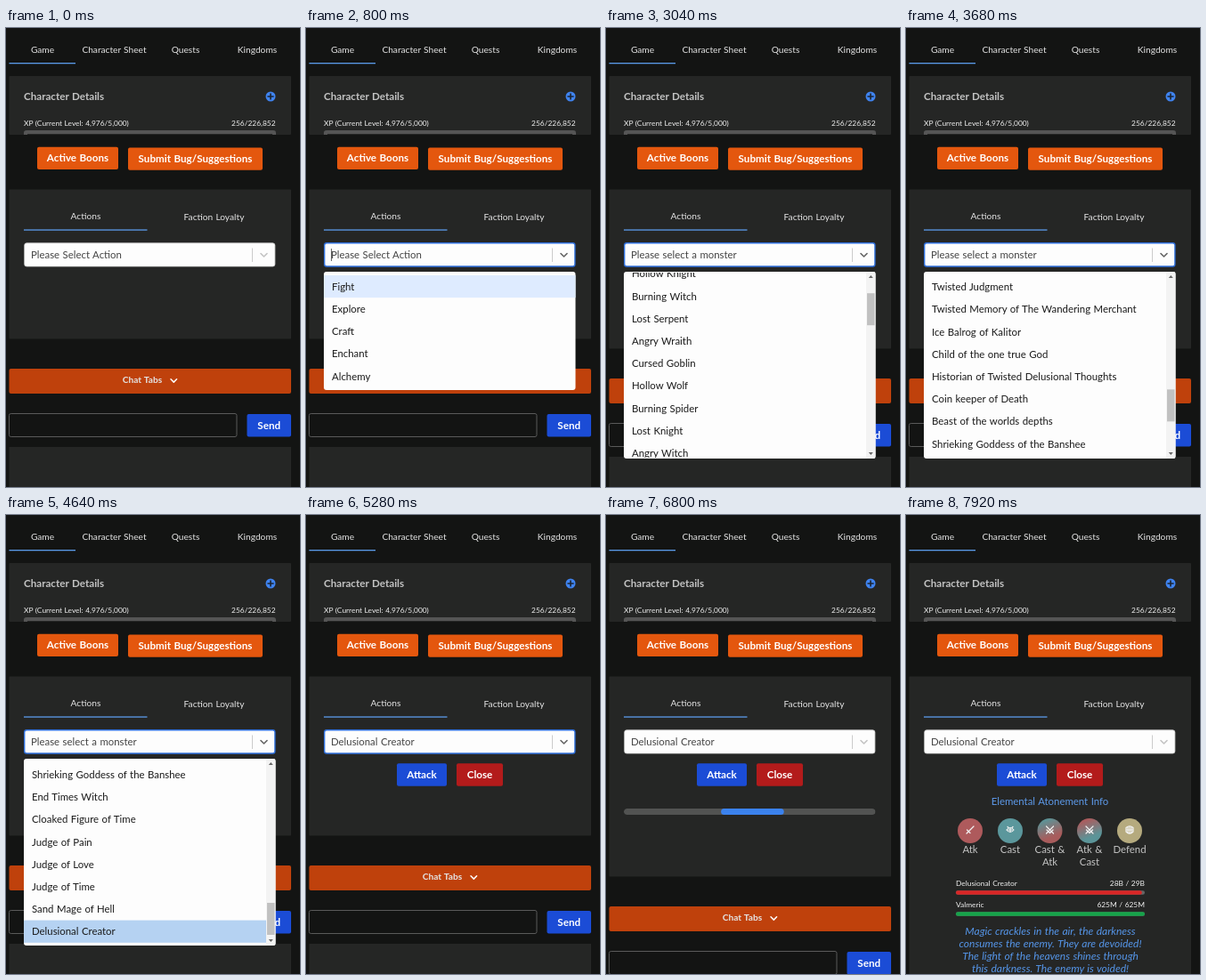
These frames come from a looping animation (330 px wide and 516 px high, 8 s). An HTML page:

```html
<!DOCTYPE html>
<html lang="en">
<head>
<meta charset="utf-8">
<title>Monster fight</title>
<style>
  html, body { margin: 0; width: 100%; height: 100%; overflow: hidden; background: #131413; }
  svg { display: block; width: 330px; height: 516px; }
  text { font: 11.4px Lato, "Open Sans", sans-serif; word-spacing: .05em; fill: #fff; }
  .bold { font-size: 11.65px; font-weight: 700; }
  .tab { font-size: 10.2px; fill: #e4e4e4; }
  .small { font-size: 8.4px; fill: #f0f0f0; }
  .value { fill: #444; }
  .dark { fill: #1a1a1a; }
  .label { fill: #c4c4c4; }
  .link { fill: #5d9aea; }
  .story { font-size: 12px; font-style: italic; fill: #5595e8; }
  .mid { text-anchor: middle; }
  .end { text-anchor: end; }
  .line { fill: none; stroke-linecap: round; stroke-linejoin: round; }
</style>
</head>
<body>
<svg id="stage" viewBox="0 0 330 516" xmlns="http://www.w3.org/2000/svg"></svg>
<script>
const LOOP = 8000, TICK = 80, ROW = 25.2;
const OPEN_ACTIONS = 560, FIGHT = 1680, OPEN_MONSTERS = 2800, CHOSEN = 4880;
const LOADING = 5840, RESULT = 7600;

// Scroll position of the monster list: [time, pixels]
const SCROLL = [[2960, 0], [3040, 90], [3280, 440], [3440, 440], [3520, 550],
                [3680, 730.4], [3840, 800], [4000, 800], [4080, 835], [4320, 906]];

const ACTIONS = ['Fight', 'Explore', 'Craft', 'Enchant', 'Alchemy'];

const kinds = ['Goblin', 'Wolf', 'Spider', 'Knight', 'Witch', 'Serpent', 'Wraith'];
const moods = ['Lost', 'Angry', 'Cursed', 'Hollow', 'Burning'];
const MONSTERS = Array.from({ length: 29 }, (_, i) => `${moods[i % 5]} ${kinds[i % 7]}`).concat(
  'Twisted Judgment', 'Twisted Memory of The Wandering Merchant', 'Ice Balrog of Kalitor',
  'Child of the one true God', 'Historian of Twisted Delusional Thoughts', 'Coin keeper of Death',
  'Beast of the worlds depths', 'Shrieking Goddess of the Banshee', 'End Times Witch',
  'Cloaked Figure of Time', 'Judge of Pain', 'Judge of Love', 'Judge of Time',
  'Sand Mage of Hell', 'Delusional Creator');

const text = (x, y, s, cls = '', extra = '') =>
  `<text x="${x}" y="${y}" class="${cls}" ${extra}>${s.replace(/&/g, '&amp;')}</text>`;
const rect = (x, y, w, h, fill, r = 0, extra = '') =>
  `<rect x="${x}" y="${y}" width="${w}" height="${h}" rx="${r}" fill="${fill}" ${extra}/>`;
const path = (d, color, width = 1.5, extra = '') =>
  `<path d="${d}" class="line" stroke="${color}" stroke-width="${width}" ${extra}/>`;
const group = (id, body, extra = '') => `<g id="${id}" ${extra}>${body}</g>`;
const button = (x, y, w, h, fill, label) =>
  rect(x, y, w, h, fill, 2) + text(x + w / 2, y + h / 2 + 4, label, 'bold mid');

function header() {
  return text(41, 27.5, 'Game', 'tab mid') + text(121.5, 28, 'Character Sheet', 'tab mid') +
    text(201.5, 28, 'Quests', 'tab mid') + text(282, 28, 'Kingdoms', 'tab mid') +
    rect(3.5, 39, 74.5, 1.3, '#5b9bea') +
    rect(3.5, 54, 316.5, 66, '#252625', 1) +
    text(20, 81, 'Character Details', 'bold label') +
    '<circle cx="297" cy="77" r="5.5" fill="#3f83f0"/>' +
    path('M294 77h6M297 74v6', '#1c2430', 1.6) +
    text(20, 110, 'XP (Current Level: 4,976/5,000)', 'small') +
    text(302.5, 110, '256/226,852', 'small end') +
    path('M22 120V117.5Q22 117 23 117H300Q301 117 301 118V120', '#555', 4) +
    rect(18, 120, 287, 4, '#131413') +
    button(35, 133.7, 91, 25.4, '#e4570e', 'Active Boons') +
    button(137, 134.4, 151, 25.4, '#e4570e', 'Submit Bug/Suggestions');
}

function chat() {
  return rect(3.5, 383, 316.5, 28, '#bf410c', 2) +
    text(153, 399, 'Chat Tabs', 'bold tab mid') + path('M185 394.8l3.3 3.3l3.3 -3.3', '#fff') +
    rect(3.5, 433.5, 255.5, 26, '#131413', 2, 'stroke="#5a5a5a"') +
    button(270.5, 434, 49.5, 25.4, '#1b4cd6', 'Send') +
    rect(3.5, 471, 316.5, 120, '#252625');
}

function select() {
  return rect(20.7, 241.8, 281.2, 26.2, '#fdfdfd', 2.5, 'id="box"') +
    text(28, 259, '', 'value', 'id="value"') +
    rect(28, 248, .8, 14, '#444', 0, 'id="caret"') +
    rect(276, 247.5, 1, 15.5, '#ccc') +
    path('M286 253.5l3.5 3.5l3.5 -3.5', '#bbb', 1.6, 'id="arrow"');
}

const option = (name, i) => text(29, 294.8 + i * ROW, name, 'dark');

function menus() {
  return group('actions',
      rect(20, 274, 282.5, 133, '#fdfdfd', 3) +
      rect(20, 278, 282.5, ROW, '#deebff', 0, 'id="pick"') + ACTIONS.map(option).join('')) +
    group('monsters',
      rect(20, 274, 282.5, 210, '#fdfdfd', 3) +
      `<g clip-path="url(#menuClip)">` +
      group('list', rect(20, 278, 272, ROW, '#deebff', 0, 'id="hover"') +
        MONSTERS.map(option).join('')) + '</g>' +
      rect(292, 274, 10.5, 210, '#f3f3f3', 2) + rect(293, 0, 8.5, 36, '#c1c1c1', 0, 'id="thumb"') +
      '<path d="M294.8 281h5l-2.5-3zM294.8 477h5l-2.5 3z" fill="#666"/>');
}

// Icons are centred on 0,0
const sword = 'M4 -4L-2 2M-3.5 0L0 3.5M-2 2L-4 4';
const crossed = sword + 'M-4 -4L2 2M3.5 0L0 3.5M2 2L4 4';
const spell = 'M-4 0Q0 -5 4 0Q0 5 -4 0M-2 0h4M0 -2v4M-3 -3.5l1 1M3 -3.5l-1 1';
const shield = 'M-4 -2.5Q0 -6 4 -2.5V2Q0 6 -4 2ZM0 -4V4M-4 0H4M-2 -3V3M2 -3V3';
const STYLES = [
  [72, '#ae5a5c', sword, 'Atk'], [117, '#5b979c', spell, 'Cast'],
  [161.5, 'url(#castAtk)', crossed, 'Cast &', 'Atk'],
  [206, 'url(#atkCast)', crossed, 'Atk &', 'Cast'], [251, '#b5aa7e', shield, 'Defend']];

function health(y, name, amount, color, part) {
  return text(56, y, name, 'small') + text(268, y, amount, 'small end') +
    rect(56, y + 5.7, 212, 4.6, '#666', 2.3) + rect(56, y + 5.7, 212 * part, 4.6, color, 2.3);
}

function result() {
  const story = ['Magic crackles in the air, the darkness', 'consumes the enemy. They are devoided!',
    'The light of the heavens shines through', 'this darkness. The enemy is voided!'];
  return text(161.5, 326, 'Elemental Atonement Info', 'link mid') +
    STYLES.map(([x, fill, icon, ...words]) =>
      `<circle cx="${x}" cy="355" r="14" fill="${fill}"/>` +
      `<g transform="translate(${x} 354)">${path(icon, '#f2f2f2', 1.2)}</g>` +
      words.map((w, i) => text(x, 380 + i * 14.4, w, 'label mid')).join('')).join('') +
    health(416.5, 'Delusional Creator', '28B / 29B', '#d92626', .985) +
    health(440.5, 'Valmeric', '625M / 625M', '#16a34a', 1) +
    story.map((s, i) => text(162, 472 + i * 14, s, 'story mid')).join('');
}

const gradient = (id, a, b) => `<linearGradient id="${id}" x2=".4" y2="1">` +
  `<stop offset=".15" stop-color="${a}"/><stop offset=".85" stop-color="${b}"/></linearGradient>`;

document.getElementById('stage').innerHTML =
  '<defs>' + gradient('castAtk', '#5b9498', '#a85c5c') + gradient('atkCast', '#ae5a5c', '#5b9498') +
  `<clipPath id="menuClip">${rect(20, 275, 272, 208)}</clipPath>` +
  `<clipPath id="trackClip">${rect(20, 330, 282.5, 7, '', 3.5)}</clipPath></defs>` +
  rect(0, 0, 330, 516, '#131413') + header() +
  rect(3.5, 181.5, 316.5, 168, '#252625', 1, 'id="panel"') +
  text(89.5, 215, 'Actions', 'tab mid') + text(233.5, 216, 'Faction Loyalty', 'tab mid') +
  rect(20, 226.4, 138.5, 1.3, '#5b9bea') +
  group('chat', chat()) + select() +
  group('fight', group('attack', button(102, 279.3, 56, 25.4, '#1b4cd6', 'Attack')) +
    button(169, 279.3, 52, 25.4, '#b31b1b', 'Close')) +
  group('loading', rect(20, 330, 282.5, 7, '#525352', 3.5) +
    rect(0, 330, 70.6, 7, '#3b82ee', 3.5, 'id="runner"'), 'clip-path="url(#trackClip)"') +
  group('result', result()) + menus();

const el = {};
document.querySelectorAll('[id]').forEach(e => el[e.id] = e);
const attackFill = el.attack.querySelector('rect');
const attackText = el.attack.querySelector('text');

const set = (e, name, value) => e.setAttribute(name, value);
const show = (e, on) => set(e, 'display', on ? 'inline' : 'none');
const within = (t, a, b) => t >= a && t < b;

function along(points, t) {
  if (t <= points[0][0]) return points[0][1];
  for (let i = 1; i < points.length; i++) {
    const [t0, a] = points[i - 1], [t1, b] = points[i];
    if (t <= t1) return a + (b - a) * (t - t0) / (t1 - t0);
  }
  return points[points.length - 1][1];
}

function draw(t) {
  const drop = t < FIGHT ? 0 : t < LOADING ? 11 : t < RESULT ? 57 : 300;
  set(el.panel, 'height', 168 + drop);
  set(el.chat, 'transform', `translate(0 ${drop})`);

  const focus = within(t, 480, FIGHT) || within(t, 2560, 5600);
  set(el.box, 'stroke', focus ? '#2f6fdc' : '#d0d0d0');
  set(el.box, 'stroke-width', focus ? 1.4 : .8);
  set(el.arrow, 'stroke', focus ? '#666' : '#c4c4c4');
  show(el.caret, within(t, OPEN_ACTIONS, 1040));
  el.value.textContent = t < FIGHT ? 'Please Select Action'
    : t < CHOSEN ? 'Please select a monster' : 'Delusional Creator';

  show(el.actions, within(t, OPEN_ACTIONS, FIGHT));
  set(el.pick, 'fill', t >= 1600 ? '#b5d2f2' : '#deebff');

  const scroll = along(SCROLL, t);
  show(el.monsters, within(t, OPEN_MONSTERS, CHOSEN));
  set(el.list, 'transform', `translate(0 ${-scroll})`);
  set(el.thumb, 'y', 283 + scroll * 153 / 906);
  const last = t >= 4560;
  show(el.hover, t < 3040 || last);
  set(el.hover, 'y', 278 + (last ? 43 * ROW : 0));
  set(el.hover, 'fill', t >= 4640 ? '#b5d2f2' : '#deebff');

  show(el.fight, t >= FIGHT);
  const ready = t >= CHOSEN;
  set(attackFill, 'fill', ready ? '#1b4cd6' : '#68a3f1');
  set(attackText, 'opacity', ready ? 1 : .75);

  show(el.loading, within(t, LOADING, RESULT));
  const turn = Math.max(0, t - 5782) / 2000 % 1;
  set(el.runner, 'x', 20 + 282.5 * (1.25 * turn - .25));
  show(el.result, t >= RESULT);
}

const start = performance.now();
function frame() {
  const t = (performance.now() - start) % LOOP;
  draw(Math.floor(t / TICK) * TICK);
  requestAnimationFrame(frame);
}
frame();
</script>
</body>
</html>
```
